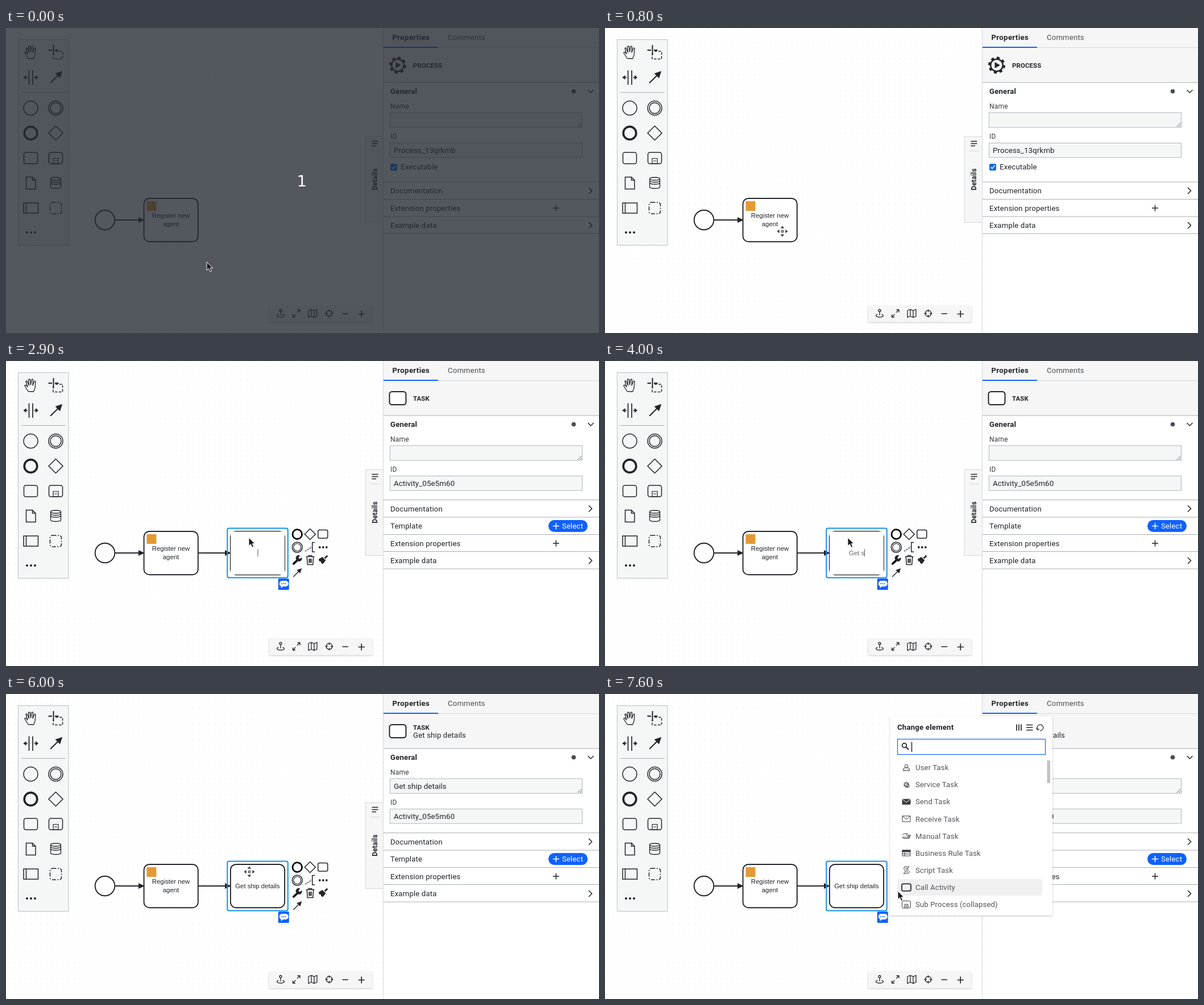
An HTML page that plays this animation: 1043x537 px, repeating every 8 s.

```html
<!DOCTYPE html>
<html lang="en">
<head>
<meta charset="utf-8">
<title>Process modeler</title>
<style>
html, body { margin: 0; width: 100%; height: 100%; overflow: hidden; background: #fff; }
svg { display: block; }
text { font: 13.2px Roboto, sans-serif; letter-spacing: .15px; fill: #22242a; white-space: pre; }
.b { font-weight: 700; letter-spacing: .2px; }
.tab { letter-spacing: .35px; }
.cap { font-size: 11.4px; font-weight: 700; }
.value { font-size: 13.5px; letter-spacing: 0; }
.label { font-size: 12px; letter-spacing: .2px; fill: #393b40; }
.help { font-size: 12px; letter-spacing: .2px; fill: #5c6068; }
.fx { font-weight: 700; font-style: italic; }
.blue { fill: #0f62fe; }
.white { fill: #fff; }
.item { fill: #55565b; letter-spacing: .1px; }
.node { font: 11.4px "Liberation Sans", Arial, sans-serif; letter-spacing: 0; text-anchor: middle; }
.count { font: 27px "DejaVu Sans", sans-serif; text-anchor: middle; }
.i { fill: none; stroke: #22242a; stroke-width: 1.5; }
.f { fill: #22242a; stroke: none; }
.rule { stroke: #a8adb3; stroke-width: 1; }
.field { fill: #f5f7f7; stroke: #b0b6bc; }
</style>
</head>
<body>
<svg id="stage" width="1043" height="537" viewBox="0 0 1043 537">
  <defs>
    <pattern id="grid" x=".3" y=".6" width="9.52" height="9.52" patternUnits="userSpaceOnUse">
      <circle cx="4.800" cy="4.800" r=".5" fill="#ccc"/>
    </pattern>
    <filter id="shadow" x="-10%" y="-20%" width="120%" height="150%">
      <feDropShadow dx="0" dy="1" stdDeviation="1.500" flood-opacity=".25"/>
    </filter>
    <g id="arrow">
      <path class="i" d="M-7 7 5-5"/><path class="f" d="M8-8 5 1-1-5z"/>
    </g>
    <g id="pad" class="i">
      <circle cx="360" cy="305" r="8.300" stroke-width="2.800" stroke="#000"/>
      <path d="M382.500 295.500 392 305 382.500 314.500 373 305z"/>
      <rect x="396.500" y="297.500" width="17" height="14.500" rx="2.500"/>
      <circle cx="360" cy="328" r="9"/><circle cx="360" cy="328" r="6.500" stroke-width="1.200"/>
      <path d="M391 319.500H386.500V336H391"/><path d="M374 335 386 327" stroke-dasharray="2.500 2"/>
      <g class="f"><circle cx="399.500" cy="328" r="1.900"/><circle cx="405.500" cy="328" r="1.900"/><circle cx="411.500" cy="328" r="1.900"/></g>
      <path stroke="#000" stroke-width="3.600" stroke-linecap="round" d="M353.500 357 361.500 349.500"/>
      <path class="f" d="M365 342.500 362 346 364 348.500 368 346A5 5 0 0 1 360 351.500 5 5 0 0 1 365 342.500"/>
      <path d="M375.500 344.500H390M380 344V342.500H385.500V344M377 345 378 358.500H387.500L388.500 345M380.800 348V355.500M382.800 348V355.500M384.800 348V355.500"/>
      <path class="f" d="M397.500 349 404 345 410 351 405 357.500 402 355.500 401 352.500 399 353zM405.500 344 408 346 412 341.500 414 344 409.500 348 411 350.500z"/>
      <use href="#arrow" x="360" y="373"/>
    </g>
    <g id="select">
      <rect x="237" y="294.500" width="106.500" height="87" rx="3" fill="none" stroke="#1090f0" stroke-width="2"/>
      <rect x="326.500" y="383" width="19" height="20" rx="1.500" fill="#0f62fe"/>
      <path fill="#fff" d="M333 387H339.500A4 4 0 0 1 339.500 397H335L331.500 399.500V396.500A5 5 0 0 1 333 387"/>
      <g class="blue"><circle cx="333" cy="392" r="1"/><circle cx="336" cy="392" r="1"/><circle cx="339" cy="392" r="1"/></g>
    </g>
    <rect id="task" x="242.600" y="300" width="95.200" height="76.200" rx="9.500" fill="#fff" stroke="#22242a" stroke-width="1.900"/>
    <g id="flow"><path d="M0 0H44" stroke="#22242a" stroke-width="1.900"/><path class="f" d="M41-5 52 0 41 5z"/></g>
  </defs>

  <rect width="1043" height="537" fill="#fff"/>
  <rect width="664" height="537" fill="url(#grid)"/>

  <!-- Tool palette -->
  <rect x="21.500" y="20.500" width="88.500" height="362" fill="#f5f7f7" stroke="#b9bec3"/>
  <path d="M27 113.500H104.500" class="rule"/>
  <g class="i">
    <path stroke-width="1.300" stroke-linejoin="round" d="M39 53.500 33 44Q32.500 42 35 42.500L38 45.500 35 36Q36 34 37.500 36L40.500 43 39.500 33Q41 31 42.500 33L43.500 42 45 32.500Q47 31 47.500 33L47 43 50 35.500Q52 34.500 52 37L51 48 48.500 54z"/>
    <path stroke-width="2" d="M83.500 30V48M74.500 39H81M86 39H92.500"/>
    <path stroke-dasharray="4.500 2.500" d="M87 41H99.500V54.500H83V45"/>
    <path stroke-width="1.700" d="M40.500 74.500V100M47 74.500V100M31 87H38M49.500 87H56"/>
    <path class="f" d="M30.500 87 35.500 83V91zM57 87 52 83V91z"/>
    <use href="#arrow" transform="translate(88 87) scale(1.400)"/>
    <circle cx="43.500" cy="141" r="12.500"/>
    <circle cx="87.500" cy="141" r="12.500"/><circle cx="87.500" cy="141" r="9.500"/>
    <circle cx="43.500" cy="185" r="11.300" stroke-width="3.700"/>
    <path d="M87.500 172.500 100 185 87.500 197.500 75 185z"/>
    <rect x="31.500" y="219" width="24" height="20" rx="3.500"/>
    <rect x="75.500" y="219" width="24" height="20" rx="3.500"/>
    <path stroke-width="1.200" d="M83 229.500H92V238.500H83zM85 234H90"/>
    <path d="M35.500 262.500H46.500L52 268V283.500H35.500zM46.500 262.500V268H52"/>
    <path stroke-width="1.300" d="M78.500 265.500A9 2.500 0 0 1 96.500 265.500V280A9 2.500 0 0 1 78.500 280zA9 2.500 0 0 0 96.500 265.500M78.500 269A9 2.500 0 0 0 96.500 269M78.500 272.500A9 2.500 0 0 0 96.500 272.500"/>
    <path d="M31 308H56.500V326H31zM35.500 308V326"/>
    <rect x="77.500" y="307" width="20" height="20" rx="4" stroke-dasharray="7 2.500 2 2.500"/>
  </g>
  <g class="f"><circle cx="37" cy="360" r="2"/><circle cx="44" cy="360" r="2"/><circle cx="51" cy="360" r="2"/></g>

  <!-- Diagram -->
  <circle cx="174" cy="338" r="17.300" fill="#fff" stroke="#22242a" stroke-width="1.900"/>
  <use href="#task"/>
  <use href="#flow" x="192" y="338"/>
  <rect x="247.500" y="305" width="17" height="17" fill="#e39a35"/>
  <text class="node" x="290" y="334">Register new</text>
  <text class="node" x="290" y="348.500">agent</text>
  <g id="second">
    <use href="#task" x="152.300"/>
    <use href="#flow" x="344" y="338"/><path d="M338 338H346" stroke="#22242a" stroke-width="1.900"/>
    <rect id="editor" x="395.200" y="300.300" width="94.800" height="75.700" fill="#fff"/>
    <text id="typed" class="node" x="442.500" y="342"></text>
    <path id="caret" stroke="#555" d="M0 331V344.500"/>
  </g>
  <use id="mark" href="#select"/>
  <use id="padUse" href="#pad"/>

  <!-- View controls -->
  <rect x="463" y="489" width="181.500" height="28.500" fill="#f6f6f6" filter="url(#shadow)"/>
  <g class="i" style="stroke-width:1.300">
    <circle cx="483" cy="497.500" r="2"/><path d="M483 499.500V506M479.500 504C474 506 477 509 483 509S492 506 486.500 504"/>
    <path d="M512.500 496H517V500.500M517 496 512 501M509 509H504.500V504.500M504.500 509 509.500 504"/>
    <path d="M532 497.500 537 495.500 542 497.500 547 495.500V507.500L542 509.500 537 507.500 532 509.500zM537 495.500V507.500M542 497.500V509.500"/>
    <circle cx="568.500" cy="502.500" r="5.300"/><path d="M568.500 495.500V500M568.500 505V509.500M561.500 502.500H566M571 502.500H575.500"/>
    <path stroke-width="1.700" d="M591.500 503H602M619.500 503.500H631M625.250 497.500V509.500"/>
  </g>

  <!-- Side panel -->
  <rect x="632.500" y="191" width="32" height="151.500" fill="#f6f6f6" stroke="#d4d6d8"/>
  <path class="i" d="M643.500 199.500H654.500M643.500 203.500H654.500M643.500 207.500H651"/>
  <path d="M641 216.500H658" stroke="#d4d6d8"/>
  <text class="b" style="font-size:12px" text-anchor="middle" transform="translate(653 266.500) rotate(-90)">Details</text>
  <rect x="664" width="379" height="537" fill="#fff"/>
  <rect x="664" width="379" height="96" fill="#f6f6f6"/>
  <path d="M663.500 0V537M760 34.500H1043" stroke="#d6d8db"/>
  <path d="M664 34H760" stroke="#0f62fe" stroke-width="2"/>
  <path d="M664 96H1043" class="rule"/>
  <text class="b tab" x="679.500" y="21">Properties</text>
  <text x="777" y="21" fill-opacity=".8">Comments</text>
  <g id="process"></g>
  <g id="template"></g>
  <g id="taskPanel"></g>

  <g id="popup"></g>
  <g id="dim">
    <rect width="1043" height="537" fill="#252a33" fill-opacity=".79"/>
    <text class="white count" x="520.500" y="279">1</text>
  </g>
  <path id="pointer" fill="#1b1b1d" stroke="#fff" d="M0 0V14.500L3.500 11.500 6 17.300 8.700 16.200 6.300 10.500H10.700z"/>
  <g id="mover" fill="#33353a" stroke="#fff" stroke-width=".8">
    <path d="M0-10 4-5H-4zM0 10 4 5H-4zM-10 0-5-4V4zM10 0 5-4V4z"/>
    <circle r="3"/><circle r="1.200"/>
  </g>
</svg>
<script>
const $ = id => document.getElementById(id);
const text = (x, y, s, c = '') => `<text x="${x}" y="${y}" class="${c}">${s}</text>`;
const path = (d, c = 'i', more = '') => `<path d="${d}" class="${c}" ${more}/>`;
const rule = (y, end = 1043) => path(`M664 ${y}H${end}`, 'rule');
const chevron = (x, y, down, more) =>
  path(down ? `M${x - 5} ${y - 2.5}l5 5 5-5` : `M${x - 3} ${y - 5.5}l5.5 5.500-5.500 5.500`, 'i', more);
const plus = (x, y, more) => path(`M${x - 5.5} ${y}h11M${x} ${y - 5.5}v11`, 'i', more);
const box = (y, h, right, s, x = 682) =>
  `<rect x="675.500" y="${y}" width="${right - 675.5}" height="${h}" class="field"/>` + text(x, y + h / 2 + 5, s, 'value');
const dropdown = (y, s) => box(y, 27, 998.5, s, 686) + chevron(990, y + 13.5, true, 'style="stroke-width:2"');
const heading = (y, s, right) => text(676, y + 4.5, s, 'b') +
  `<circle cx="${right - 30}" cy="${y}" r="3.800" fill="#4a4c58"/>` + chevron(right, y, true);
const row = (y, s, end, right = 1028) => text(676, y + 4.5, s) +
  (end === '+' ? plus(967.5, y) : end === '>' ? chevron(right, y) : end);
const pill = (x, y, w, s, inner) =>
  `<rect x="${x}" y="${y}" width="${w}" height="21" rx="10.500" class="blue"/>` + inner + s;
const whiteStroke = 'style="stroke:#fff"';

const general = (id, right, name = '') => heading(111.5, 'General', right) +
  text(676, 142, 'Name', 'label') + box(149, 26, right - 15, name) +
  path(`M${right - 23} 174l7-7M${right - 19} 174l3-3`, 'i', 'style="stroke:#666;stroke-width:1"') +
  text(676, 195, 'ID', 'label') + box(202.5, 25.5, right - 15, id);

$('process').innerHTML =
  `<circle cx="689" cy="65.500" r="13" class="i" style="stroke-width:4" pathLength="16" stroke-dasharray="1"/>
   <circle cx="689" cy="65.500" r="10.800" class="i" style="stroke-width:2.500"/>` +
  path('M685.500 60 695 65.500 685.500 71z', 'f') + text(716, 69.5, 'PROCESS', 'cap') +
  general('Process_13qrkmb', 1028.5) +
  '<rect x="676" y="239" width="12" height="12" rx="2" fill="#0d6be8"/>' +
  path('M678.500 245 681 247.500 685.500 242', 'i', whiteStroke) + text(694, 248.5, 'Executable') +
  rule(271) + row(286.5, 'Documentation', '>') + rule(301.5) +
  row(317, 'Extension properties', '+') + rule(332) + row(347.5, 'Example data', '>') + rule(362);

$('template').innerHTML =
  '<rect x="674" y="50.500" width="30" height="30" fill="#e39a35"/>' +
  text(716, 63, 'STARPEDDLERS', 'cap') + text(716, 77, 'Register new agent') + text(945.5, 70, 'Save as', 'blue') +
  '<g fill="none" stroke="#0f62fe" stroke-width="1.500"><circle cx="1000" cy="62" r="3"/><circle cx="1006.500" cy="69" r="2.700"/><path d="M1003 62Q1006 62.500 1006.500 66M1000 65Q1000.500 68.500 1004 69"/></g>' +
  general('Activity_0k72g4z', 1014, 'Register new agent') +
  rule(244.5, 1030) + row(260, 'Template', '>', 1014) +
  pill(917, 249.5, 77, text(925.5, 264.5, 'Applied', 'white'), chevron(981, 260, true, whiteStroke)) +
  rule(275, 1030) + heading(290.5, 'Operation', 1014) + text(676, 321, 'Category', 'label') +
  dropdown(328.5, 'Game') + text(676, 370.5, 'Select the category to use (i.e. the API endpoint)', 'help') +
  text(676, 394, 'Operation', 'label') + dropdown(401.5, 'register - Register New Agent') +
  text(676, 444, 'Specify the operation to call.', 'help') +
  rule(467, 1030) + heading(483, 'Parameters', 1014) + text(676, 513, 'symbol', 'label') +
  text(723, 513, 'fx', 'fx') + box(519.5, 27, 998.5, 'Velindo') +
  '<rect x="1030" y="96.500" width="13" height="441" fill="#f1f1f1"/><rect x="1032" y="110" width="10" height="229" fill="#bfbfbf"/>' +
  path('M1033 106 1036.500 102 1040 106zM1033 527 1036.500 531 1040 527z', 'f', 'fill-opacity=".8"');

$('taskPanel').innerHTML =
  '<rect x="674.500" y="54" width="29" height="23" rx="4.500" class="i" style="stroke-width:2;fill:#fff"/>' +
  '<text id="kind" x="716" class="cap">TASK</text><text id="title" x="716" y="77"></text>' +
  general('Activity_05e5m60', 1028.5) + '<text id="nameValue" x="682" y="167" class="value"></text>' +
  rule(244.5) + row(260, 'Documentation', '>') + rule(275) + row(290.5, 'Template', '') +
  pill(954, 280, 69, text(978, 295, 'Select', 'white'), plus(967.5, 290.5, whiteStroke)) +
  rule(305.5) + row(321, 'Extension properties', '+') + rule(335.5) + row(351.5, 'Example data', '>') + rule(366);

// Small glyphs for the popup list, drawn around 0,0
const glyphs = [
  '<circle cy="-2.500" r="2.800"/><path d="M-5.500 5.500V2Q-4 0-2 .5H2Q4 0 5.500 2V5.500zM-3 3V5M3 3V5"/>',
  '<circle r="4" stroke-width="2" pathLength="16" stroke-dasharray="1"/><circle r="3"/><circle cx="2" cy="2" r="3"/>',
  '<path fill="#3c3d42" d="M-7-4.500H7V4.500H-7z"/><path stroke="#fff" d="M-7-4.500 0 1 7-4.500"/>',
  '<path d="M-7-5H7V5H-7zL0 1 7-5"/>',
  '<path d="M-7-2Q-4-5 0-4H2L0-1.500H7V.5H2M6 .5V2.500H2M5 2.500V4.500H-4Q-7 4-7 2z"/>',
  '<path d="M-7-5H7V5H-7zM-7 1.500H7M-3-1V5"/><path fill="#3c3d42" d="M-7-5H7V-2H-7z"/>',
  '<path d="M-3-6H5Q0-2 4 1T2 6H-5Q0 3-3 0T-3-6M-2-3H2M-1 0H2M-1 3H3"/>',
  '<rect x="-8" y="-6" width="16" height="12.500" rx="2.500" stroke-width="2"/>',
  '<rect x="-7.500" y="-6" width="15" height="12.500" rx="2"/><path d="M-3 0H3V6H-3zM0 1.500V4.500M-1.500 3H1.500"/>'
];
const items = ['User Task', 'Service Task', 'Send Task', 'Receive Task', 'Manual Task',
  'Business Rule Task', 'Script Task', 'Call Activity', 'Sub Process (collapsed)'];
$('popup').innerHTML =
  '<rect x="501.500" y="39" width="285.500" height="351" fill="#fff" filter="url(#shadow)"/>' +
  text(514, 63, 'Change element', 'b') +
  path('M724 53.500V64.500M728 53.500V64.500M732 53.500V64.500M741 54.500H752.500M741 59H752.500M741 63.500H752.500', 'i', 'style="stroke-width:1.700"') +
  path('M761 62A5.300 5.300 0 1 1 765 64.500M759 59.500 760.500 63.500 764 61.500', 'i', 'style="stroke-width:1.200"') +
  '<rect x="514.500" y="79.500" width="260" height="27" fill="#fff" stroke="#0f62fe" stroke-width="1.200"/>' +
  '<circle cx="526.500" cy="90.500" r="3.800" class="i" style="stroke-width:1.800"/>' +
  path('M529.500 93.500 534 98', 'i', 'style="stroke-width:2"') + path('M539.500 84.500V102') +
  '<rect x="514" y="326" width="255" height="29" rx="4" fill="#f0f0f1"/><rect x="777.500" y="117" width="5.500" height="40" fill="#c3c3c3"/>' +
  items.map((s, k) => {
    const y = 129.5 + k * 30.1;
    return `<g transform="translate(530 ${y})" fill="none" stroke="#3c3d42">${glyphs[k]}</g>` + text(546, y + 4.7, s, 'item');
  }).join('');

const label = 'Get ship details';
const keys = [3200, 3400, 3500, 3800, 4000, 4100, 4300, 4500, 4700, 4800, 4900, 5100, 5200, 5300, 5500, 5600];
const route = [[0, 353, 412], [100, 355, 414], [600, 318, 366], [800, 312, 358], [1000, 308, 352], [1500, 411, 297],
  [1800, 413, 298], [2200, 413, 298], [2500, 427, 311], [5900, 427, 311], [6000, 428, 313],
  [6200, 428, 313], [6300, 462, 326], [6400, 505, 342], [6500, 505, 342], [7400, 515, 347], [8000, 515, 347]];
const PICK = 900, APPEND = 2200, COMMIT = 6000, POPUP = 7600;

const show = (id, on) => { $(id).style.display = on ? '' : 'none'; };
function cursorAt(t) {
  const k = route.findIndex(p => p[0] > t), [a, x, y] = route[k - 1], [b, u, v] = route[k];
  const f = (t - a) / (b - a);
  return [x + (u - x) * f, y + (v - y) * f];
}

function draw(now) {
  const t = Math.floor(now % 8000 / 100) * 100;
  const appended = t >= APPEND, done = t >= COMMIT, editing = appended && !done;
  show('dim', t < 100);
  show('process', t < PICK);
  show('template', t >= PICK && !appended);
  show('taskPanel', appended);
  show('second', appended);
  show('mark', t >= PICK);
  show('padUse', t >= PICK && t < POPUP);
  show('editor', editing);
  show('popup', t >= POPUP);
  $('mark').setAttribute('x', appended ? 152.3 : 0);
  $('padUse').setAttribute('x', appended ? 152.3 : 0);

  const typed = $('typed');
  typed.textContent = label.slice(0, keys.filter(k => k <= t).length);
  typed.style.fill = done ? '#22242a' : '#666';
  show('caret', editing && t >= 2900);
  const width = appended && typed.textContent ? typed.getComputedTextLength() : 0;
  $('caret').setAttribute('transform', `translate(${443 + width / 2})`);
  $('kind').setAttribute('y', done ? 63 : 69.5);
  $('title').textContent = $('nameValue').textContent = done ? label : '';

  const [x, y] = cursorAt(t);
  const left = done ? 394.5 : 242.5;
  const over = !editing && x > left && x < left + 96 && y > 300 && y < 376;
  show('mover', over);
  show('pointer', !over);
  $(over ? 'mover' : 'pointer').setAttribute('transform', `translate(${x} ${y})`);
}

function tick() {
  draw(performance.now());
  requestAnimationFrame(tick);
}
tick();
</script>
</body>
</html>
```
